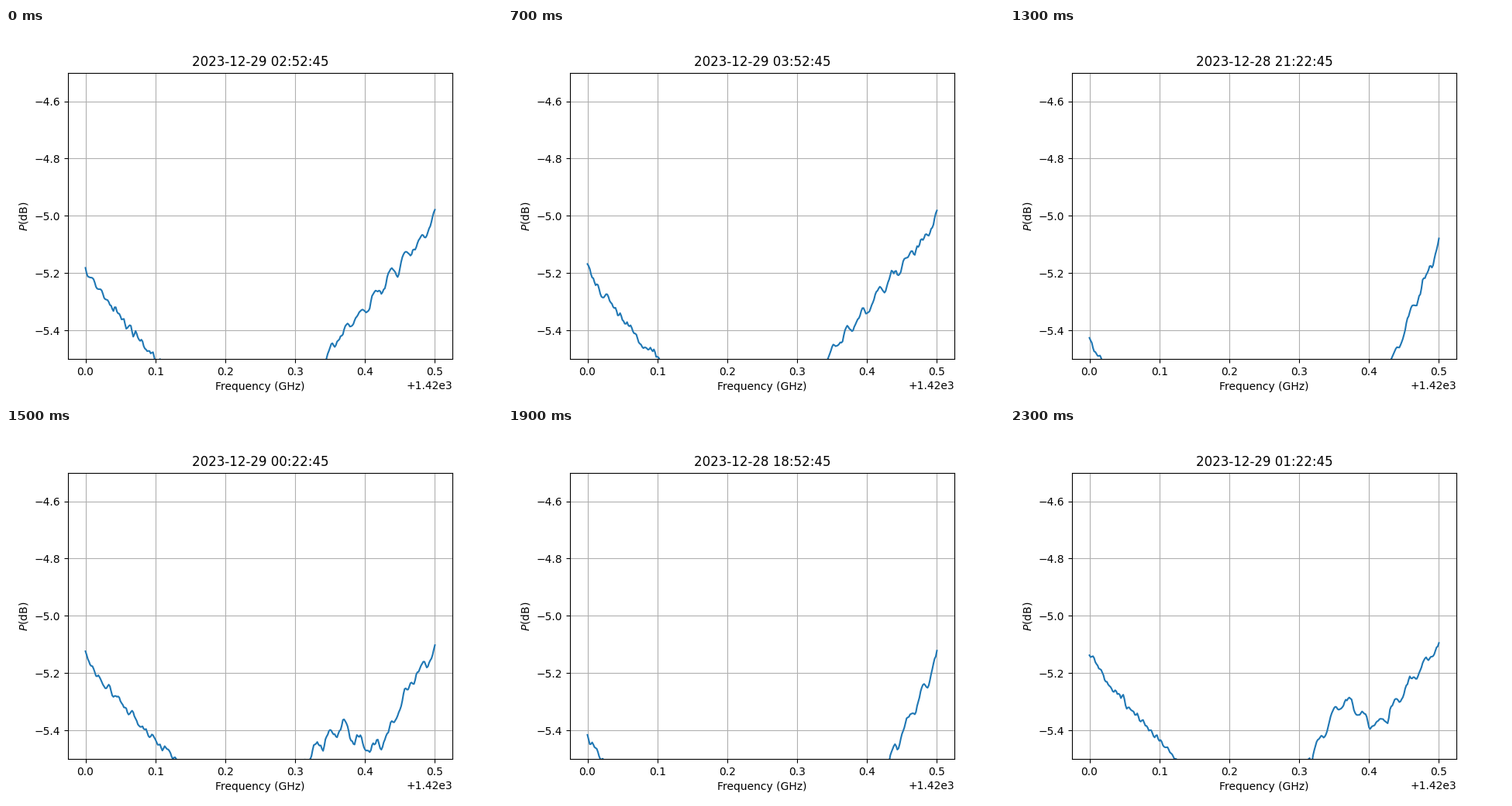
Recreate the animation shown at these times as a matplotlib script. Size 640 by 480 pixels, loop 2.4 s.

```python
import numpy as np
import matplotlib.pyplot as plt
from matplotlib.animation import FuncAnimation

# Playing order of the half-hourly scans; the first one is held twice as long.
ORDER = [20, 20, 12, 6, 18, 3, 14, 22, 10, 1, 16, 7, 0,
         9, 19, 15, 5, 11, 2, 4, 13, 21, 8, 17]
START = 16 * 60 + 52  # minutes of the first scan on day 28

BASE = 1420
FREQ = np.linspace(0, 0.5, 301)
FLOOR = 50      # lower limit of the plot, in 0.01 dB below -5
RIPPLE = 0.0217  # spacing of the standing wave

# How the band drifts through the night.
SCANS = [1, 4, 9, 15, 17, 18, 20]
DRIFT = {
    "left": [37, 42, 43, 13.5, 13, 15.5, 18],
    "left_end": [0.037, 0.022, 0.015, 0.128, 0.125, 0.124, 0.102],
    "right": [9.5, 12, 7.5, 10, 8.5, 9, -1],
    "right_end": [0.427, 0.431, 0.431, 0.315, 0.315, 0.317, 0.347],
    "dip": [0, 0, 0, 17, 9.5, 2.5, 0],
    "hump": [0, 0, 0, 2, 10, 9, 2],
}


def bell(center, width):
    return np.exp(-0.5 * ((FREQ - center) / width) ** 2)


def spectrum(scan):
    """Two flanks, slow bumps, ripple and receiver noise, in dB."""
    p = {name: np.interp(scan, SCANS, keys) for name, keys in DRIFT.items()}

    left = p["left"] + (FLOOR - p["left"]) * (FREQ / p["left_end"]) ** 0.83

    depth = 0.5 - FREQ
    slope = (FLOOR - p["right"]) / (0.5 - p["right_end"])
    tip = 5 * (1 - np.exp(-depth / 0.006)) * np.exp(-depth / 0.04)
    wave = np.cos(2 * np.pi * (FREQ - 0.458) / RIPPLE)
    wave *= 1.8 * np.clip(depth / 0.03, 0, 1)
    right = (p["right"] + slope * depth + tip - wave
             + p["dip"] * bell(0.42, 0.028) - p["hump"] * bell(0.362, 0.02))

    noise = np.random.default_rng(scan).normal(0, 1.2, len(FREQ))
    noise = np.convolve(noise, [0.25, 0.5, 0.25], "same")
    return -5 - (np.minimum(left, right) + noise) / 100


def stamp(scan):
    day, minute = divmod(START + 30 * scan, 24 * 60)
    return f"2023-12-{28 + day} {minute // 60:02d}:{minute % 60:02d}:45"


fig, ax = plt.subplots(figsize=(6.4, 4.8), dpi=100)
line, = ax.plot(BASE + FREQ, spectrum(ORDER[0]))
title = ax.set_title(stamp(ORDER[0]))
ax.set_xlim(BASE - 0.025, BASE + 0.525)
ax.set_ylim(-5.5, -4.5)
ax.set_yticks(np.arange(-5.4, -4.5, 0.2))
ax.set_xlabel("Frequency (GHz)")
ax.set_ylabel("$P$(dB)")
ax.grid(True)


def draw(frame):
    scan = ORDER[frame]
    line.set_ydata(spectrum(scan))
    title.set_text(stamp(scan))
    return line, title


anim = FuncAnimation(fig, draw, frames=len(ORDER), interval=100,
                     repeat=True, repeat_delay=0, blit=False)
plt.show()
```
